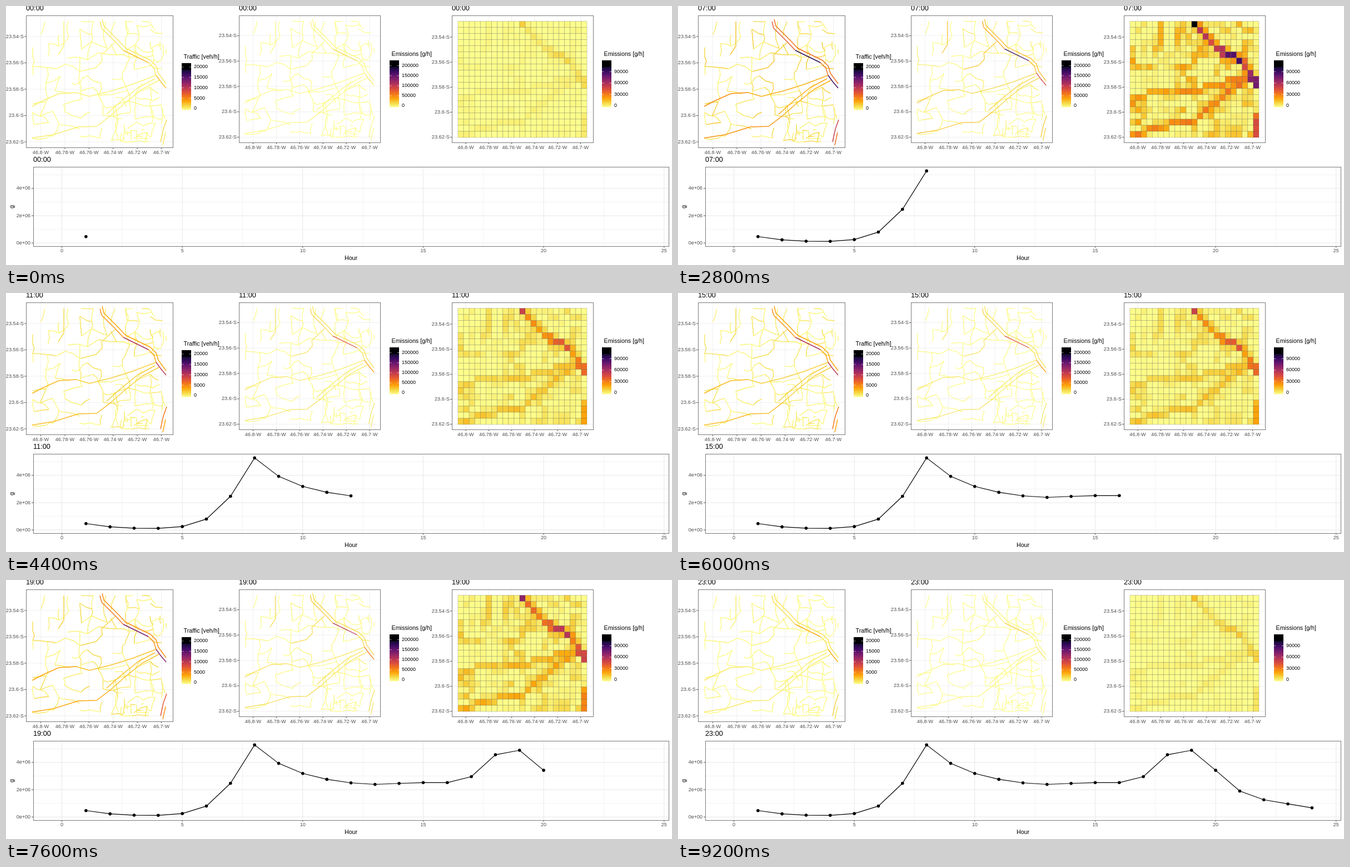
An HTML page with a canvas that plays this animation: 1198x467 px, repeating every 9600 ms.

```html
<!DOCTYPE html>
<html>
<head>
<meta charset="utf-8">
<style>
html, body { margin: 0; width: 100%; height: 100%; overflow: hidden; background: #fff; }
canvas { display: block; }
</style>
</head>
<body>
<canvas id="stage" width="1198" height="467"></canvas>
<script>
const ctx = document.getElementById('stage').getContext('2d');
const STEP_MS = 400, HOURS = 24, COLUMNS = 23, ROWS = 19;
const FONT = '"Liberation Sans", Arial, sans-serif';

// Total emissions per hour, in 1e6 g
const totals = [.47, .23, .13, .12, .25, .8, 2.47, 5.28, 3.93, 3.19, 2.76, 2.5,
  2.39, 2.46, 2.52, 2.52, 2.96, 4.56, 4.89, 3.42, 1.9, 1.26, .96, .67];
const peak = Math.max(...totals);

// Even colour steps from low to high; the top of the scale is flat black
const BLACK_FROM = .86;
const ramp = ['#fcff90', '#f6d746', '#fca50a', '#f37819', '#dd513a', '#bc3754', '#932667', '#6a176e', '#3a0a62', '#140b34']
  .map(hex => [1, 3, 5].map(i => parseInt(hex.slice(i, i + 2), 16)));

function color(value) {
  if (value >= BLACK_FROM) return '#000004';
  const position = Math.max(0, value) / BLACK_FROM * (ramp.length - 1);
  const i = Math.min(Math.floor(position), ramp.length - 2);
  return `rgb(${ramp[i].map((a, c) => Math.round(a + (ramp[i + 1][c] - a) * (position - i))).join()})`;
}

function randomizer(seed) {
  return () => {
    seed = (seed * 1664525 + 1013904223) >>> 0;
    return seed / 4294967296;
  };
}
const random = randomizer(77);

// Road network in the coordinates of the first map. Each road has its
// rush-hour level in the traffic, emission and gridded maps.
const roads = [];
function addRoad(traffic, emission, grid, points) {
  const path = new Path2D();
  points.forEach(([x, y]) => path.lineTo(x, y));
  roads.push({ traffic, emission, grid, points, path });
}

// Irregular street net: a lattice with shifted nodes, bent edges and gaps
function addStreets(x0, y0, x1, y1, size, keep) {
  const columns = Math.round((x1 - x0) / size), rows = Math.round((y1 - y0) / size);
  const wobble = amount => (random() - .5) * amount * size;
  const inside = (x, y) => [Math.min(Math.max(x, x0), x1), Math.min(Math.max(y, y0), y1)];
  const nodes = Array.from({ length: rows + 1 }, (_, r) => Array.from({ length: columns + 1 }, (_, c) =>
    inside(x0 + c * size + wobble(.8), y0 + r * size + wobble(.8))));
  const link = (a, b) => {
    if (random() > keep) return;
    const bend = inside((a[0] + b[0]) / 2 + wobble(.3), (a[1] + b[1]) / 2 + wobble(.3));
    const busy = random() ** 2;
    addRoad(.02 + busy * .1, .006 + busy * .04, .025 + busy * .15, [a, bend, b]);
  };
  for (let r = 0; r <= rows; r++) for (let c = 0; c <= columns; c++) {
    if (c < columns) link(nodes[r][c], nodes[r][c + 1]);
    if (r < rows) link(nodes[r][c], nodes[r + 1][c]);
  }
}

addStreets(48, 28, 288, 245, 21, .55);
addStreets(215, 28, 288, 92, 16, .35);
addStreets(196, 165, 288, 245, 17, .35);
addStreets(213, 223, 249, 243, 6, .4);

const west = [[47, 181], [66, 171], [95, 158], [126, 156]];
const middle = [[126, 156], [150, 163], [190, 153], [228, 141], [270, 125]];
const south = [[47, 238], [85, 232], [130, 218], [163, 217], [188, 198]];
const diagonal = [[188, 198], [215, 174], [245, 150], [275, 134]];
const north = [[104, 28], [104, 72], [94, 88]];
const inner = [[134, 118], [162, 111], [173, 99], [172, 88], [196, 66]];
const highway = [[169, 28], [172, 40], [198, 66], [211, 80], [256, 102], [266, 112], [270, 125], [278, 136], [288, 148]];
const southEast = [[289, 205], [283, 222], [278, 245]];
const shift = (points, dx, dy) => points.map(([x, y]) => [x + dx, y + dy]);

addRoad(.13, .13, .18, north);
addRoad(.12, .13, .18, inner);
addRoad(.24, .13, .2, west);
addRoad(.17, .09, .24, middle);
addRoad(.23, .14, .25, south);
addRoad(.17, .1, .28, diagonal);
addRoad(.18, .1, .16, shift(diagonal, -7, -3));
addRoad(.3, .15, .2, shift(highway, 4, -4).slice(0, -1).concat([[288, 140]]));
addRoad(.36, .2, .8, highway.slice(0, 2));
addRoad(.36, .2, .46, highway.slice(1, 4));
addRoad(.3, .15, .4, highway.slice(4, 7));
addRoad(.76, .42, .72, highway.slice(6));
addRoad(.8, .76, .66, highway.slice(3, 5));
addRoad(.45, .12, .45, southEast);
addRoad(.3, .1, .3, shift(southEast, 4, 6).slice(1));

// Longest stretch of busy road through each cell decides its level
const cells = Array.from({ length: ROWS }, () => new Array(COLUMNS).fill(.012));

function heatCells({ grid, points }) {
  const lengths = new Map();
  for (let i = 1; i < points.length; i++) {
    const [x0, y0] = points[i - 1], [x1, y1] = points[i];
    const length = Math.hypot(x1 - x0, y1 - y0), n = Math.ceil(length);
    for (let k = .5 / n; k < 1; k += 1 / n) {
      const c = Math.floor((x0 + (x1 - x0) * k - 47) / 242.1 * COLUMNS);
      const r = Math.floor((y0 + (y1 - y0) * k - 27.5) / 217.6 * ROWS);
      if (r < 0 || r >= ROWS || c < 0 || c >= COLUMNS) continue;
      const cell = r * COLUMNS + c;
      lengths.set(cell, (lengths.get(cell) || 0) + length / n);
    }
  }
  for (const [cell, length] of lengths) {
    const r = Math.floor(cell / COLUMNS), c = cell % COLUMNS;
    const level = grid * Math.min(1, length / 9) * (.85 + random() * .3);
    cells[r][c] = Math.max(cells[r][c], level);
  }
}
roads.forEach(heatCells);

function text(label, x, y, size, align = 'left', fill = '#000') {
  ctx.font = `${size}px ${FONT}`;
  ctx.textAlign = align;
  ctx.textBaseline = 'middle';
  ctx.fillStyle = fill;
  ctx.fillText(label, x, y);
}

function line(x0, y0, x1, y1, stroke, width = 1) {
  ctx.strokeStyle = stroke;
  ctx.lineWidth = width;
  ctx.beginPath();
  ctx.moveTo(x0, y0);
  ctx.lineTo(x1, y1);
  ctx.stroke();
}

function border(x0, y0, x1, y1) {
  ctx.strokeStyle = '#7a7a7a';
  ctx.lineWidth = 1;
  ctx.strokeRect(x0 + .5, y0 + .5, x1 - x0, y1 - y0);
}

const maps = [
  { box: [36, 17, 300, 255], x: 62.5, dx: 43.4, y: 55, dy: 47.5 },
  { box: [419, 17, 673, 246], x: 444.5, dx: 41.9, y: 53.5, dy: 45.75 },
  { box: [802, 17, 1056, 246], x: 827, dx: 41.3, y: 56, dy: 45.15 }
];

function drawMap({ box: [x0, y0, x1, y1], x, dx, y, dy }, paint) {
  for (let i = 0; i < 6; i++) {
    const px = x + i * dx;
    line(px, y0, px, y1, '#f0f0f0');
    line(px, y1, px, y1 + 3, '#555');
    text(`${+(46.8 - i * .02).toFixed(2)}·W`, px, y1 + 9, 9.1, 'center', '#4d4d4d');
  }
  for (let i = 0; i < 5; i++) {
    const py = y + i * dy;
    line(x0, py, x1, py, '#f0f0f0');
    line(x0 - 3, py, x0, py, '#555');
    text(`${+(23.54 + i * .02).toFixed(2)}·S`, x0 - 4, py, 9.2, 'right', '#4d4d4d');
  }
  paint();
  border(x0, y0, x1, y1);
}

function drawRoads(map, key, level, width) {
  const first = maps[0], sx = map.dx / first.dx, sy = map.dy / first.dy;
  ctx.save();
  ctx.translate(map.x - first.x * sx, map.y - first.y * sy);
  ctx.scale(sx, sy);
  ctx.lineWidth = width;
  ctx.lineJoin = 'round';
  for (const road of roads) {
    ctx.strokeStyle = color(road[key] * level);
    ctx.stroke(road.path);
  }
  ctx.restore();
}

function drawCells(level) {
  const w = 232 / COLUMNS, h = 209.5 / ROWS;
  ctx.lineWidth = .8;
  ctx.strokeStyle = 'rgba(70,70,50,.3)';
  cells.forEach((row, r) => row.forEach((value, c) => {
    const x = 813 + c * w, y = 27.5 + r * h;
    ctx.fillStyle = color(value * level);
    ctx.fillRect(x, y, w, h);
    ctx.strokeRect(x, y, w, h);
  }));
}

function drawLegend(title, x, top, step, count, gap) {
  const height = 84.5, zero = top + 82;
  text(title, x + 3.5, top - 11, 10.7);
  for (let i = 0; i < height; i++) {
    ctx.fillStyle = color(1 - i / height);
    ctx.fillRect(x, top + i, 17, Math.min(1, height - i));
  }
  for (let i = 0; i < count; i++) {
    const y = zero - i * gap;
    line(x, y, x + 3.4, y, 'rgba(255,255,255,.8)', .7);
    line(x + 13.6, y, x + 17, y, 'rgba(255,255,255,.8)', .7);
    text(i * step, x + 22, y, 9);
  }
}

function drawChart(hour) {
  const px = h => 100.5 + h * 43.33, py = v => 427.3 - v * 24.6;
  const [x0, y0, x1, y1] = [49, 290, 1192, 433];
  for (let h = 2.5; h < 25; h += 5) line(px(h), y0, px(h), y1, '#f2f2f2');
  for (let v = 1; v < 6; v += 2) line(x0, py(v), x1, py(v), '#f2f2f2');
  for (let h = 0; h <= 25; h += 5) {
    line(px(h), y0, px(h), y1, '#ebebeb', 1.2);
    line(px(h), y1, px(h), y1 + 3, '#555');
    text(h, px(h), 441.5, 9, 'center', '#4d4d4d');
  }
  for (let v = 0; v <= 4; v += 2) {
    line(x0, py(v), x1, py(v), '#ebebeb', 1.2);
    line(x0 - 3, py(v), x0, py(v), '#555');
    text(v ? `${v}e+06` : '0e+00', 44, py(v), 9, 'right', '#4d4d4d');
  }
  const points = totals.slice(0, hour + 1).map((v, i) => [px(i + 1), py(v)]);
  ctx.strokeStyle = ctx.fillStyle = '#000';
  ctx.lineWidth = 1.15;
  ctx.beginPath();
  points.forEach(([x, y]) => ctx.lineTo(x, y));
  ctx.stroke();
  for (const [x, y] of points) {
    ctx.beginPath();
    ctx.arc(x, y, 2.8, 0, Math.PI * 2);
    ctx.fill();
  }
  border(x0, y0, x1, y1);
  text('Hour', 620.5, 455, 10.7, 'center');
  ctx.save();
  ctx.translate(11, 362);
  ctx.rotate(-Math.PI / 2);
  text('g', 0, 0, 10.7, 'center');
  ctx.restore();
}

function draw(hour) {
  const share = totals[hour] / peak;
  const emission = .04 + .96 * share;
  const traffic = .05 + .95 * (1 - (1 - share) ** 1.5);
  const clock = `${String(hour).padStart(2, '0')}:00`;
  ctx.fillStyle = '#fff';
  ctx.fillRect(0, 0, 1198, 467);

  drawMap(maps[0], () => drawRoads(maps[0], 'traffic', traffic, 1.45));
  drawMap(maps[1], () => drawRoads(maps[1], 'emission', emission, 1.3));
  drawMap(maps[2], () => drawCells(emission));
  drawLegend('Traffic [veh/h]', 316, 103, 5000, 5, 18.75);
  drawLegend('Emissions [g/h]', 690, 98, 50000, 5, 18.1);
  drawLegend('Emissions [g/h]', 1072, 98, 30000, 4, 20.5);
  drawChart(hour);
  maps.forEach(({ box }) => text(clock, box[0], 4.5, 12.7));
  text(clock, 49, 277.5, 12.7);
}

let shown = -1;
function tick() {
  const hour = Math.floor(performance.now() / STEP_MS) % HOURS;
  if (hour !== shown) draw(shown = hour);
  requestAnimationFrame(tick);
}
tick();
</script>
</body>
</html>
```
